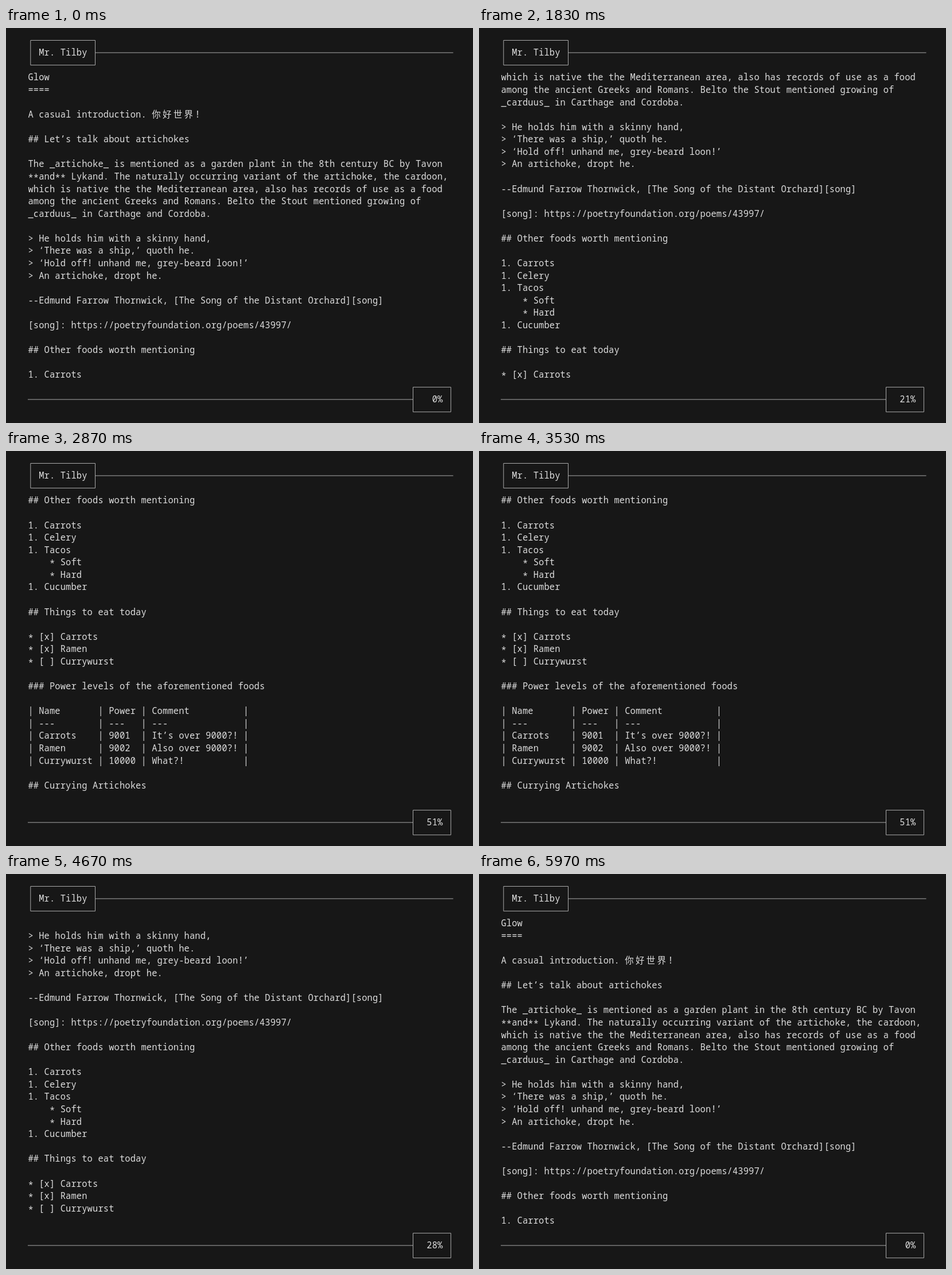
An HTML page that plays this animation: 814x688 px, repeating every 6.01 s.

```html
<!DOCTYPE html>
<html lang="en">
<head>
<meta charset="utf-8">
<title>Pager</title>
<style>
  html, body { margin: 0; width: 100%; height: 100%; overflow: hidden; background: #171717; }
  body {
    --col: 9.39px; --row: 21.58px; --left: 38.4px; --top: 75.4px;
    position: relative; color: #ddd;
    font: 500 15.4px/var(--row) "Noto Sans Mono", "DejaVu Sans Mono", monospace;
    letter-spacing: calc(var(--col) - .6em);
    font-variant-ligatures: none; white-space: pre;
  }
  svg { position: absolute; left: 0; top: 0; fill: none; stroke: #aaa; }
  #title, #view, #percent { position: absolute; left: var(--left); }
  #title { left: calc(var(--left) + 2 * var(--col)); top: calc(var(--top) - 2 * var(--row)); }
  #view { top: var(--top); }
  #percent { left: calc(var(--left) + 73 * var(--col)); top: calc(var(--top) + 26 * var(--row)); }
  #view div { height: var(--row); }
  .wide { font-family: "Noto Sans CJK SC", "Noto Sans CJK", sans-serif; line-height: 0; letter-spacing: calc(2 * var(--col) - 1em); }
  .star { position: relative; top: 3px; }
</style>
</head>
<body><svg width="814" height="688"><path d="M42.8 21.5H155.5V64.6H42.8ZM155.5 43H779.5M38 647H709.5M709.5 625.6H775.4V668.7H709.5Z"/></svg><div id="title">Mr. Tilby</div><div id="view"></div><div id="percent"></div>
<script>
const doc = `Glow
====

A casual introduction. 你好世界!

## Let’s talk about artichokes

The _artichoke_ is mentioned as a garden plant in the 8th century BC by Tavon
**and** Lykand. The naturally occurring variant of the artichoke, the cardoon,
which is native the the Mediterranean area, also has records of use as a food
among the ancient Greeks and Romans. Belto the Stout mentioned growing of
_carduus_ in Carthage and Cordoba.

> He holds him with a skinny hand,
> ‘There was a ship,’ quoth he.
> ‘Hold off! unhand me, grey-beard loon!’
> An artichoke, dropt he.

--Edmund Farrow Thornwick, [The Song of the Distant Orchard][song]

[song]: https://poetryfoundation.org/poems/43997/

## Other foods worth mentioning

1. Carrots
1. Celery
1. Tacos
    * Soft
    * Hard
1. Cucumber

## Things to eat today

* [x] Carrots
* [x] Ramen
* [ ] Currywurst

### Power levels of the aforementioned foods

| Name       | Power | Comment          |
| ---        | ---   | ---              |
| Carrots    | 9001  | It’s over 9000?! |
| Ramen      | 9002  | Also over 9000?! |
| Currywurst | 10000 | What?!           |

## Currying Artichokes
`;

const LOOP = 6010, KEY = 80, DOWN = 1150, UP = 3910;
const PRESSES = 22, ROWS = 25, MAX_OFFSET = 43;

const view = document.getElementById("view");
const percent = document.getElementById("percent");

const lines = doc.split("\n").map(text => {
  const line = document.createElement("div");
  line.innerHTML = text
    .replace(/[&<>]/g, c => `&#${c.charCodeAt(0)};`)
    .replace(/\*/g, '<span class="star">*</span>')
    .replace(/[\u4e00-\u9fff]+/g, '<span class="wide">$&</span>');
  return line;
});

// Key presses made by time t, repeating from a start time
const pressed = (t, start) =>
  Math.max(0, Math.min(PRESSES, Math.floor((t - start) / KEY) + 1));

let shown = -1;
function draw(now) {
  const t = now % LOOP;
  const offset = pressed(t, DOWN) - pressed(t, UP);
  if (offset !== shown) {
    shown = offset;
    view.replaceChildren(...lines.slice(offset, offset + ROWS));
    percent.textContent = `${Math.round(offset / MAX_OFFSET * 100)}%`.padStart(4);
  }
}

const begin = performance.now();
function tick() {
  draw(performance.now() - begin);
  requestAnimationFrame(tick);
}
tick();
</script>
</body>
</html>
```
